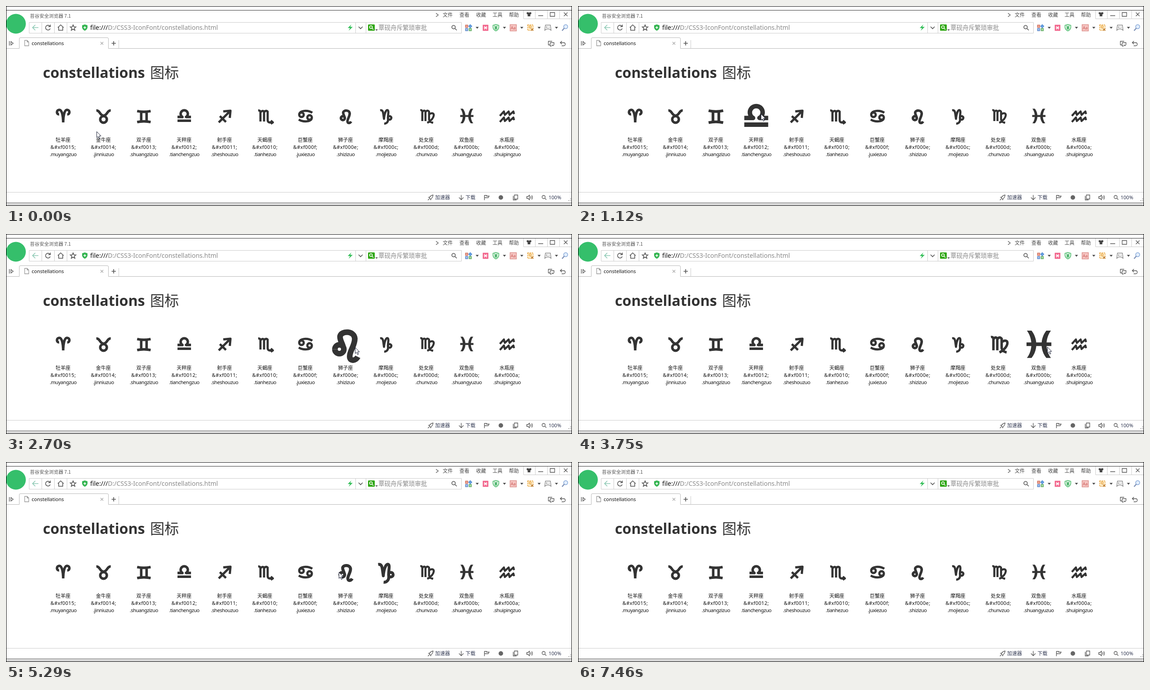
Recreate the animation shown at these times as an HTML page. Size 1257 by 445 pixels, loop 7.99 s.

```html
<!DOCTYPE html>
<html lang="zh-CN">
<head>
<meta charset="utf-8">
<title>constellations</title>
<style>
  html, body { margin: 0; width: 100%; height: 100%; overflow: hidden; background: #fff; }
  svg { display: block; }
  text { font-family: "Noto Sans", "Noto Sans CJK SC", "Noto Sans CJK", sans-serif; font-size: 11px; fill: #111; }
  .zh, .menu text { font-family: "Noto Sans CJK SC", "Noto Sans CJK", sans-serif; }
  .menu text { fill: #444; }
  .title { font-size: 32.2px; font-weight: 700; fill: #333; }
  .title2 { font-size: 32px; font-weight: 300; fill: #333; }
  .url { font-size: 14px; }
  .label text { text-anchor: middle; }
  .code { letter-spacing: .4px; }
  .cls { letter-spacing: -.45px; }
  .status text { fill: #2f3650; }
  .line { fill: none; stroke: #555; stroke-width: 1.3; }
  .rule { fill: none; stroke: #ccc; }
  .sign { fill: none; stroke: #333; stroke-linejoin: round; }
</style>
</head>
<body>
<svg id="stage" width="1257" height="445" viewBox="0 0 1257 445">
  <rect width="1257" height="445" fill="#fff"/>

  <!-- window title row -->
  <circle cx="22" cy="39.5" r="22" fill="#35bf6b"/>
  <text class="zh" x="53" y="26" style="font-size:10.6px;fill:#555">苔谷安全浏览器 7.1</text>
  <g class="menu">
    <text x="970" y="24">文件</text><text x="1007" y="24">查看</text><text x="1044" y="24">收藏</text>
    <text x="1080.5" y="24">工具</text><text x="1117" y="24">帮助</text>
  </g>
  <path class="rule" d="M1149.5 10V28.5H1256M1175.5 10V28M1202.5 10V28M1229.5 10V28"/>
  <path d="M1156 15L1159 13.5Q1161.5 16 1164 13.5L1167 15L1166 18.5L1164.5 18V23H1158.5V18L1157 18.5Z" fill="#444"/>
  <path class="line" d="M955 16L960 20L955 24M1182 21.5H1193M1208.5 14.5H1218.5V23H1208.5ZM1239 14.5L1247 22.5M1247 14.5L1239 22.5"/>

  <!-- address row -->
  <path class="rule" d="M51.5 36.5H1011.5V60.5H51.5ZM79.5 37V60M107.5 37V60M135.5 37V60M776.5 37V60M799.5 37V60"/>
  <path d="M72 48H59M65 42L59 48L65 54" fill="none" stroke="#8cc9b4" stroke-width="1.6"/>
  <g class="line" style="stroke-width:1.6">
    <path d="M97.5 45A5.3 5.3 0 1 0 98.2 50M98.5 41.5V46H94"/>
    <path d="M115 48L121.5 42L128 48M117 47V54H126V47"/>
    <path d="M149 42L150.8 46.2L155.3 46.5L151.9 49.4L153 54L149 51.5L145 54L146.1 49.4L142.7 46.5L147.2 46.2Z"/>
    <path d="M783 46L787.5 50.5L792 46"/>
    <circle cx="994" cy="47" r="3.8"/><path d="M997 50L1001 54"/>
  </g>
  <path d="M169 43L175 41L181 43V48Q180 53 175 55Q170 53 169 48Z" fill="#35b552"/>
  <path d="M175 45V51M172 48H178" stroke="#fff" stroke-width="1.5"/>
  <text class="url" x="187" y="53">file:///<tspan fill="#8a8a8a">D:/CSS3-IconFont/constellations.html</tspan></text>
  <path d="M767 41L759 49H764L761 55L770 46.5H764.5Z" fill="#2fbd55"/>
  <rect x="804" y="41" width="15" height="14" rx="1.5" fill="#2fa713"/>
  <g fill="none" stroke="#fff" stroke-width="1.6"><circle cx="810.5" cy="47" r="3"/><path d="M813 49.5L816 52.5"/></g>
  <path d="M820 52H826L823 55Z" fill="#555"/>
  <text class="zh" x="827" y="53" style="font-size:13.5px;fill:#8a8a8a">覃砚舟斥繁琐审批</text>

  <!-- toolbar icons -->
  <g fill="none" stroke-width="1.4">
    <path d="M1020.5 42.5h5v5h-5z" stroke="#cf6a55" fill="#f0b3a5"/>
    <path d="M1020.5 50h5v5h-5z" stroke="#5a86c8" fill="#a9c6ee"/>
    <path d="M1028.5 50h5v5h-5z" stroke="#5aa95c" fill="#b6dfb0"/>
    <path d="M1031 41.5L1034.5 45L1031 48.5L1027.5 45Z" stroke="#4a86d0" fill="#6da8e8"/>
    <rect x="1059.5" y="42.5" width="11" height="12" fill="#f46c91" stroke="#ef5d85"/>
    <path d="M1062 45L1068 52M1068 45L1062 52M1061 48.5H1069" stroke="#fff"/>
    <path d="M1081.5 43L1088 41L1094.5 43V48Q1093.5 53 1088 55.5Q1082.5 53 1081.5 48Z" stroke="#47b969" fill="#e2f6e5"/>
    <path d="M1085 44L1088 47.5L1091 44M1088 47V53M1085 48H1091M1085 50.5H1091" stroke="#35a85a"/>
    <rect x="1119.5" y="41.5" width="14" height="14" fill="#f6c6c3" stroke="#dc8c88"/>
    <rect x="1158.5" y="42" width="12" height="12" stroke="#e69d35" fill="#fff0cf" stroke-dasharray="3 1.5"/>
    <circle cx="1164" cy="46.5" r="2.4" stroke="#e69d35"/><path d="M1166 50L1171 55M1171 50L1166 55" stroke="#b46e20"/>
    <path d="M1198 42.5H1209L1210.5 54L1206 51H1201L1196.5 54Z" stroke="#888"/>
    <path d="M1199.5 47H1202.5M1201 45.5V48.5M1205 47H1207" stroke="#888"/>
    <circle cx="1243" cy="46" r="4.5" stroke="#82a5d7" fill="#e4effc"/><path d="M1240 49L1235 55" stroke="#8194b8" stroke-width="2.5"/>
  </g>
  <text x="1121" y="52" style="font-size:9px;fill:#c75450">Aa</text>
  <path d="M1043 46.5h7l-3.5 4zM1103.5 46.5h7l-3.5 4zM1142 46.5h7l-3.5 4zM1180.5 46.5h7l-3.5 4zM1219 46.5h7l-3.5 4z" fill="#444"/>

  <!-- tab row -->
  <path d="M0 94.5H29.5V73Q29.5 70.5 32 70.5H225Q227.5 70.5 227.5 73V94.5H1257" fill="none" stroke="#b9b9b9"/>
  <path class="rule" d="M250.5 76V94"/>
  <g class="line">
    <path d="M7.5 78V88M11 79L16 83L11 87Z"/>
    <path d="M41.5 76.5H47L50.5 80V88.5H41.5ZM47 76.5V80H50.5" stroke="#999"/>
    <path d="M210 80L216 86M216 80L210 86" stroke="#aaa"/>
    <path d="M234.5 83H244M239.2 78.3V87.7" stroke-width="1.7"/>
    <path d="M1213 78.5H1204.5V86.5H1208M1208.5 81.5H1217V86M1208.5 81.5V89H1212M1212 86L1214.5 88.5L1217 86"/>
    <path d="M1234.5 78L1231 81.5L1234.5 85M1231 81.5H1238Q1242 81.5 1242 85Q1242 88.5 1238 88.5H1234"/>
  </g>
  <text x="57" y="87">constellations</text>

  <!-- page -->
  <text class="title" x="82" y="160">constellations</text>
  <text class="zh title2" x="320" y="160">图标</text>
  <g id="signs"></g>

  <!-- status bar -->
  <path class="rule" d="M0 414.5H1257"/>
  <g class="status">
    <text class="zh" x="953" y="430">加速器</text><text class="zh" x="1020.5" y="430">下载</text>
    <text x="1205" y="430">100%</text>
  </g>
  <g class="line">
    <path d="M948.5 420.5Q943 421 940 427L943 430Q948 426 948.5 420.5ZM940 425L937.5 426M944 429L943 432M940 429L937 432"/>
    <path d="M1011 420.5V431M1006 426L1011 431L1016 426"/>
    <path d="M1062.5 432V421.5H1067.5V423H1073L1071 426.5H1062.5"/>
    <path d="M1129 420.5H1136.5V429.5H1129ZM1126.5 422.5V431.5H1134"/>
    <path d="M1156.5 424H1159L1162.5 421V431L1159 428H1156.5ZM1165 423.5Q1167 426 1165 428.5M1167.5 421.5Q1171 426 1167.5 430.5"/>
    <circle cx="1194" cy="425" r="3.5"/><path d="M1196.5 427.5L1200 431"/>
  </g>
  <circle cx="1099" cy="426" r="5" fill="#666"/>
  <path d="M1253 428h2v2h-2zM1253 432h2v2h-2zM1249 432h2v2h-2z" fill="#aaa"/>

  <!-- outer frame -->
  <rect y="437" width="1257" height="7" fill="#d2d2d2"/>
  <path d="M0 437.5H1257" stroke="#8a8a8a"/>
  <path d="M0 9.5H1257" stroke="#333"/>
  <rect x=".5" y=".5" width="1256" height="444" fill="none" stroke="#000"/>

  <path id="cursor" d="M.5 .5V14L3.6 11.2L5.8 16.3L8 15.3L5.8 10.2H10Z" fill="#fff" stroke="#1d2238"/>
</svg>
<script>
const LOOP = 7990, FIRST_X = 127, GAP = 89.62, MID_Y = 244;

const ring = (x, y, r) =>
  `M${x - r} ${y}a${r} ${r} 0 1 0 ${2 * r} 0a${r} ${r} 0 1 0 ${-2 * r} 0`;
const wave = y =>
  `M-16 ${y}L-7 ${y - 10}L-5 ${y - 2}L3.5 ${y - 10}L5.5 ${y - 2}L14 ${y - 10}L15.5 ${y - 4}`;

// label, code, class, stroke width, outline around the column centre
const SIGNS = [
  ['牡羊座', 'f0015', 'muyangzuo', 5.6,
    'M0 15C0 4 -2 -13 -8.5 -13C-15.5 -13 -15.5 -2.5 -9 -3M0 15C0 4 2 -13 8.5 -13C15.5 -13 15.5 -2.5 9 -3'],
  ['金牛座', 'f0014', 'jinniuzuo', 5.6,
    ring(0, 8.3, 7.3) + 'M-16 -11.5C-8 -12 -8 0 0 0C8 0 8 -12 16 -11.5'],
  ['双子座', 'f0013', 'shuangzizuo', 5.6,
    'M-15 -10.3Q0 -7 15 -10.3M-15 14.3Q0 11 15 14.3M-6 -9V13M6 -9V13'],
  ['天秤座', 'f0012', 'tianchengzuo', 5.6,
    'M-15 2.9H-4A8 8 0 1 1 4 2.9H15M-15 11.3H15'],
  ['射手座', 'f0011', 'sheshouzuo', 5,
    'M-13 15L12 -10M-3 -9.5L13 -11L11.5 5M-10.5 1L3 14'],
  ['天蝎座', 'f0010', 'tianhezuo', 4.8,
    'M-15 -11.5Q-10 -12 -10 -7V13M-10 -7Q-6 -13 -2 -9V13M-2 -8Q3 -13 6 -9V10Q6 16.5 16 15M13 11L17.5 15L13 18'],
  ['巨蟹座', 'f000f', 'juxiezuo', 5,
    ring(-8.5, -2, 5) + ring(9.5, 4, 5) + 'M15.5 -6.5C7 -12.5 -13.5 -13 -13.5 -2M-14.5 8.5C-6 14.5 14.5 15 14.5 4'],
  ['狮子座', 'f000e', 'shizizuo', 5.6,
    ring(-6.2, 5.5, 4.4) + 'M-2.5 3C-4 -2 -6 -4 -5.5 -7.5C-4 -13 8.5 -13 9 -5C9 2 4 7 4 12.5C4 18 10 17 12 13'],
  ['摩羯座', 'f000c', 'mojiezuo', 4.8,
    ring(8, 5, 3.8) + 'M-13 -12C-7 -13 -6.5 -8 -5.5 0L-4.5 7C-3.5 -5 0 -14 4 -12C7 -10 3.5 0 4.5 8C5 14 1 18 -4 17.5'],
  ['处女座', 'f000d', 'chunvzuo', 4.5,
    'M-13.5 -12Q-9 -13 -9 -8V12M-9 -8Q-5 -14 -2 -9V12M-2 -8Q2 -14 6 -9V8Q7 14 15 16M6 -3C20 -12 21 6 2 16'],
  ['双鱼座', 'f000b', 'shuangyuzuo', 4.3,
    'M-14.5 .7H15'],
  ['水瓶座', 'f000a', 'shuipingzuo', 4.4,
    wave(.5) + wave(14)]
];
const FISH = 'M-14 -15.5H-8.5C-1 -6 -1 8 -8.5 17H-14C-7 8 -7 -6 -14 -15.5Z' +
             'M14.5 -15.5H9C1.5 -6 1.5 8 9 17H14.5C7.5 8 7.5 -6 14.5 -15.5Z';

// start time, cursor x and y, scale of each grown sign by column
const STEPS = [
  [0, 201, 279, {}],
  [100, 141, 251, { 0: 2.3 }],
  [560, 310, 246, { 1: 2 }],
  [1120, 406, 240, { 2: 1.08, 3: 1.77 }],
  [1650, 561, 246, { 4: 1.8 }],
  [2190, 677, 248, { 5: 1.25, 6: 1.6 }],
  [2700, 775, 252, { 7: 2.25 }],
  [3240, 898, 252, { 8: 2.25 }],
  [3750, 1042, 251, { 9: 1.22, 10: 1.87 }],
  [4290, 1130, 250, { 11: 2.25 }],
  [4790, 1004, 250, { 10: 2.05 }],
  [5290, 739, 245, { 7: 1.2, 8: 1.34 }],
  [5830, 477, 245, { 4: 1.3, 5: 1.3 }],
  [6360, 216, 244, { 1: 1.25, 2: 1.2 }],
  [6900, 112, 247, { 0: 2.25 }],
  [7460, -40, 250, {}]
];

function add(parent, tag, attrs, text) {
  const node = document.createElementNS('http://www.w3.org/2000/svg', tag);
  for (const key in attrs) node.setAttribute(key, attrs[key]);
  if (text) node.textContent = text;
  return parent.appendChild(node);
}

const root = document.getElementById('signs');
const cursor = document.getElementById('cursor');
const columnX = i => FIRST_X + i * GAP;

const icons = SIGNS.map(([label, code, cls, width, d], i) => {
  const x = columnX(i);
  const texts = add(root, 'g', { class: 'label' });
  add(texts, 'text', { class: 'zh', x: x - .3, y: 302 }, label);
  add(texts, 'text', { class: 'code', x, y: 318 }, `&#x${code};`);
  add(texts, 'text', { class: 'cls', x, y: 334 }, '.' + cls);
  const icon = add(root, 'g', {});
  add(icon, 'path', { class: 'sign', d, 'stroke-width': width });
  if (cls === 'shuangyuzuo') add(icon, 'path', { d: FISH, fill: '#333' });
  return icon;
});

let shown;
function draw() {
  const t = performance.now() % LOOP;
  const step = STEPS.findLast(s => s[0] <= t);
  if (step !== shown) {
    const [, x, y, scales] = shown = step;
    cursor.setAttribute('transform', `translate(${x} ${y})`);
    icons.forEach((icon, i) =>
      icon.setAttribute('transform', `translate(${columnX(i)} ${MID_Y}) scale(${scales[i] || 1})`));
  }
  requestAnimationFrame(draw);
}
draw();
</script>
</body>
</html>
```
